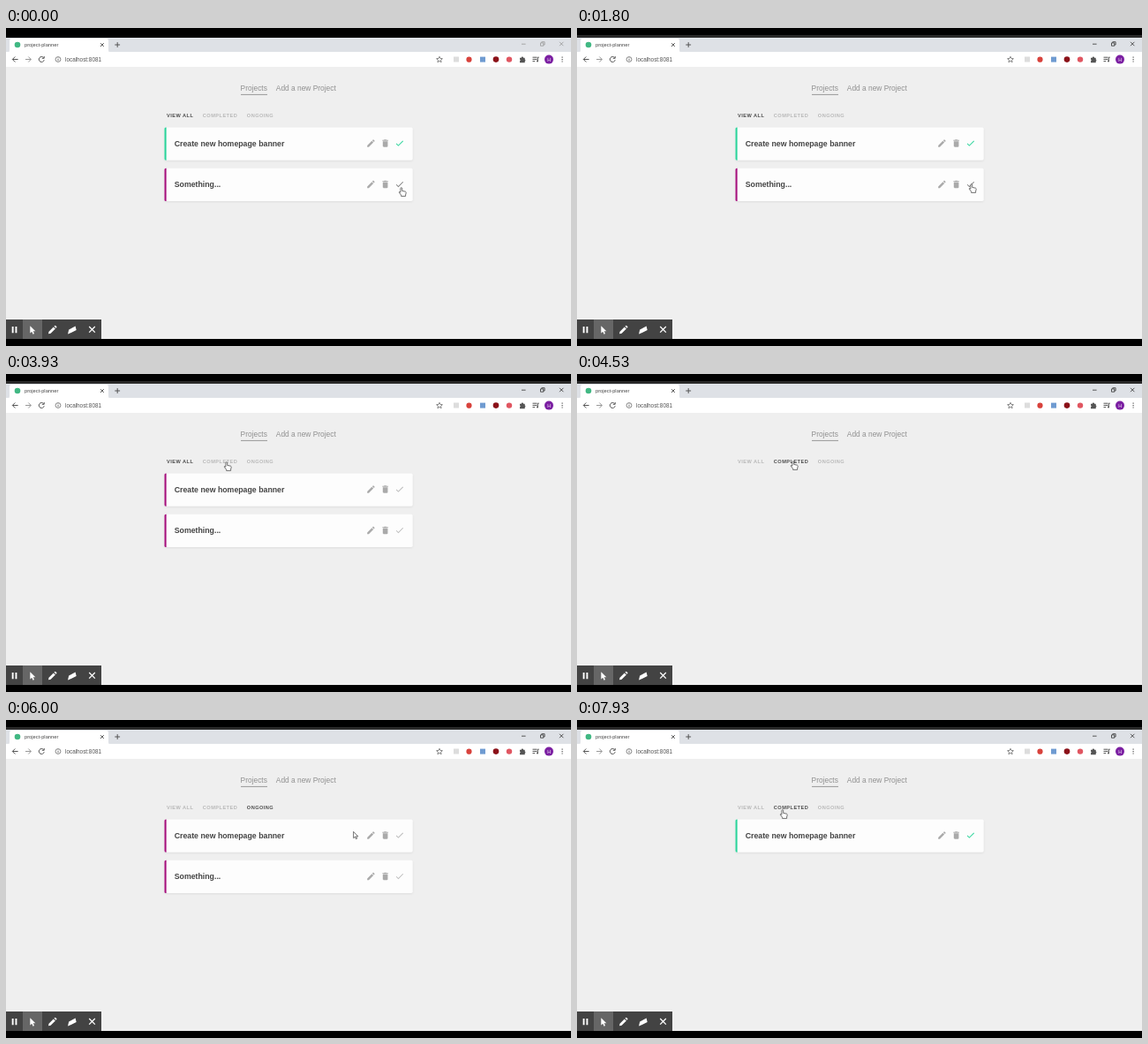
An HTML page for the animation above (8 s loop, 640x360 px).

```html
<!DOCTYPE html>
<html lang="en">
<head>
<meta charset="utf-8">
<title>Project planner</title>
<style>
  html, body { margin: 0; width: 100%; height: 100%; overflow: hidden; background: #000; }
  svg { display: block; width: 100vw; height: 100vh; }
  text { font-family: "Liberation Sans", Arial, sans-serif; }
  .nav { font-size: 8.4px; fill: #909090; }
  .filter { font-size: 5.62px; font-weight: bold; letter-spacing: .47px; fill: #b8b8b8; }
  .filter.on { fill: #4c4c4c; }
  .title { font-size: 8.77px; font-weight: bold; fill: #444; }
  .icon { fill: #aaa; }
  .line { fill: none; stroke: #555; stroke-width: 1; }
  .body { fill: #fdfdfd; filter: drop-shadow(.5px 1px .8px rgba(0,0,0,.07)); }
</style>
</head>
<body>
<svg viewBox="0 0 640 360">
  <rect width="640" height="360"/>
  <rect id="strip" y="8" width="640" height="3"/>

  <!-- tab strip -->
  <rect y="11" width="640" height="17" fill="#dee1e6"/>
  <path d="M1 28Q4 28 4 25V14Q4 12 6 12H114Q116 12 116 14V25Q116 28 119 28Z" fill="#fff"/>
  <circle cx="13" cy="19" r="3.3" fill="#41b883"/>
  <text x="21" y="21.2" font-size="5.75" fill="#444">project-planner</text>
  <path class="line" stroke-width=".8" d="M107 17.2l3.8 3.8m0-3.8l-3.8 3.8M123.3 19h5.8M126.2 16.1v5.8"/>
  <path id="controls" fill="none" stroke-width=".8" d="M584 18.2h4.6M605.5 16.9h3.3v3.3h-3.3zM606.8 16.9v-1.2h3.3v3.3h-1.3M627 15.8l4.4 4.4m0-4.4l-4.4 4.4"/>

  <!-- address row -->
  <rect y="27" width="640" height="17" fill="#fff"/>
  <path class="line" d="M13.6 35.5H7.4M10.3 32.5l-3 3 3 3"/>
  <path class="line" style="stroke:#999" d="M22 35.5h6.2M25.3 32.5l3 3-3 3"/>
  <path class="line" d="M42.6 33.6a3 3 0 1 0 .6 2.6M43.2 32v2.3h-2.4"/>
  <circle class="line" style="stroke-width:.7" cx="59" cy="35.5" r="2.9"/>
  <path class="line" style="stroke-width:.8" d="M59 35v2.1M59 33.6v.8"/>
  <text x="67" y="37.8" font-size="6.36" fill="#555">localhost:8081</text>
  <path class="line" style="stroke-width:.7" d="M491 32.3l1 2.2 2.4.2-1.8 1.6.5 2.4-2.1-1.3-2.1 1.3.5-2.4-1.8-1.6 2.4-.2z"/>
  <rect x="507" y="32.5" width="6" height="6" fill="#ddd"/>
  <circle cx="524.5" cy="35.7" r="3.1" fill="#d8423c"/>
  <rect x="537" y="32.6" width="6" height="6" fill="#6f9bd1"/>
  <circle cx="555" cy="35.6" r="3.3" fill="#8b1018"/>
  <circle cx="570" cy="35.6" r="3.2" fill="#e05661"/>
  <path fill="#555" d="M582 33.7h1.7a1.2 1.2 0 0 1 2.4 0h1.6v1.8a1.2 1.2 0 0 1 0 2.2v1.5H582v-1.7a1.1 1.1 0 0 0 0-2z"/>
  <path class="line" d="M596.5 33.2h5M596.5 35.4h5M596.5 37.6h2.7M602.3 37.5v-4.3h1.5"/>
  <circle cx="602" cy="37.6" r="1" fill="#555"/>
  <circle cx="615" cy="35.6" r="5" fill="#7b1fa2"/>
  <text x="615" y="37.5" font-size="5.2" fill="#fff" text-anchor="middle">H</text>
  <path d="M629.5 32.6h1.2v1.2h-1.2zM629.5 35h1.2v1.2h-1.2zM629.5 37.4h1.2v1.2h-1.2z" fill="#555"/>

  <!-- page -->
  <rect y="44" width="640" height="308" fill="#efefef"/>
  <text class="nav" x="265.6" y="71">Projects</text>
  <path d="M266 75.4h30" stroke="#999" stroke-width="1"/>
  <text class="nav" x="305.8" y="71">Add a new Project</text>
  <g id="filters"></g>
  <g id="cards"></g>

  <!-- recorder bar -->
  <rect y="330" width="108" height="22" fill="#434343"/>
  <rect x="19" y="330" width="22" height="22" fill="#666"/>
  <g fill="#fff">
    <path d="M6.7 338h1.9v7.2H6.7zM10.5 338h1.9v7.2h-1.9z"/>
    <path d="M27.3 337.2v8.3l2-1.7 1.3 2.9 1.4-.6-1.3-2.8h2.6z"/>
    <path d="M48 346.3l.5-2.6 5.3-5.3 2.1 2.1-5.3 5.3zM54.5 337.7l.8-.7q.5-.3.9 0l1.1 1.1q.3.5 0 .9l-.7.8z"/>
    <path d="M70 346.6l1.2-5.1 7.4-4 1.1 4.4-6 3.1z"/>
  </g>
  <path d="M94.2 338l6.6 6.6m0-6.6l-6.6 6.6" stroke="#fff" stroke-width="1.3"/>

  <circle id="ring" fill="none" stroke="#db6070" stroke-width="2.2"/>
  <path id="cursor" stroke="#444" stroke-width=".75" fill="#fff" stroke-linejoin="round"/>
</svg>
<script>
const LOOP = 8000;
const GREEN = '#2bd49a', PURPLE = '#a5107c';
const SLOT_TOP = 112.4, SLOT_STEP = 46.4;

const ICONS = {
  edit: 'M3 17.25V21h3.75L17.81 9.94l-3.75-3.75L3 17.25zM20.71 7.04c.39-.39.39-1.02 0-1.41l-2.34-2.34c-.39-.39-1.02-.39-1.41 0l-1.83 1.83 3.75 3.75 1.83-1.83z',
  bin: 'M6 19c0 1.1.9 2 2 2h8c1.1 0 2-.9 2-2V7H6v12zM19 4h-3.5l-1-1h-5l-1 1H5v2h14V4z',
  done: 'M9 16.2L4.8 12l-1.4 1.4L9 19 21 7l-1.4-1.4L9 16.2z'
};
const HAND = 'M-1.1 .7Q-1.1-.3-.2-.3T.7 .7V3.4L4.5 4.2Q5.3 4.5 5.2 5.6L4.6 8V9.4H-.4V8.2L-2.6 5.4Q-2.9 4.3-2 4.5L-1.1 5.2Z';
const ARROW = 'M0 0V7.3L1.7 5.8 2.8 8.3 4 7.8 2.9 5.4H5.2Z';

// Cursor hotspot: time, x, y
const PATH = [
  [0, 448, 181], [500, 447, 179], [1800, 447, 177], [2000, 447, 174],
  [2350, 446, 135], [2860, 446, 132], [3130, 428, 134], [3330, 428, 134],
  [3930, 250, 100], [4130, 245, 99], [4600, 245, 99], [5100, 282.5, 98],
  [5400, 282.5, 98], [6100, 400, 128], [6800, 428.5, 135], [6860, 446, 131],
  [7000, 446, 131], [7500, 235, 101], [7930, 233, 102]
];
const HOLDS = [[1860, 2000], [3130, 3330], [6860, 7000]];
const CLICKS = [600, 1300, 2700, 4090, 5260, 7560];
const VIEWS = [[0, 'all'], [4090, 'completed'], [5260, 'ongoing'], [7560, 'completed']];
const FILTERS = [['all', 'VIEW ALL', 182], ['completed', 'COMPLETED', 222.8], ['ongoing', 'ONGOING', 272.8]];

const $ = id => document.getElementById(id);

function add(parent, tag, attrs, text) {
  const el = document.createElementNS('http://www.w3.org/2000/svg', tag);
  for (const key in attrs) el.setAttribute(key, attrs[key]);
  if (text) el.textContent = text;
  return parent.appendChild(el);
}

const filters = FILTERS.map(([view, label, x]) =>
  ({ view, el: add($('filters'), 'text', { class: 'filter', x, y: 101.2 }, label) }));

function makeCard(title, isDone) {
  const group = add($('cards'), 'g', {});
  const icon = (name, x) => add(group, 'path',
    { class: 'icon', d: ICONS[name], transform: `translate(${x} 12.5) scale(.4685)` });
  add(group, 'rect', { class: 'body', x: 179.5, width: 281.2, height: 37.3, rx: 1.8 });
  const edge = add(group, 'path', { d: 'M181.6 0V37.3H181Q179.5 37.3 179.5 35.6V1.7Q179.5 0 181 0Z' });
  add(group, 'text', { class: 'title', x: 190.7, y: 21.7 }, title);
  icon('edit', 407.8);
  icon('bin', 424);
  return { group, edge, check: icon('done', 440.2), isDone };
}

const cards = [
  makeCard('Create new homepage banner', t => t < 2700 || t >= 6860),
  makeCard('Something...', t => t >= 600 && t < 1300)
];

function cursorAt(t) {
  const i = PATH.findIndex(p => p[0] > t);
  if (i < 0) return PATH[PATH.length - 1].slice(1);
  const [t0, x0, y0] = PATH[Math.max(i - 1, 0)], [t1, x1, y1] = PATH[i];
  const u = Math.max(0, (t - t0) / (t1 - t0)), ease = u * u * (3 - 2 * u);
  return [x0 + (x1 - x0) * ease, y0 + (y1 - y0) * ease];
}

const overCheck = ([x, y], top) => x > 440 && x < 452 && y > top + 12 && y < top + 24;
const overFilter = ([x, y]) => y > 94 && y < 105 &&
  (x > 182 && x < 212 || x > 222 && x < 263 || x > 272 && x < 303);

function drawCards(t, view, pointer) {
  const trailing = cursorAt(t - 200);
  let slot = 0, hand = false;
  for (const { group, edge, check, isDone } of cards) {
    const done = isDone(t);
    const shown = view === 'all' || done === (view === 'completed');
    group.style.display = shown ? '' : 'none';
    if (!shown) continue;
    const top = SLOT_TOP + SLOT_STEP * slot++;
    group.setAttribute('transform', `translate(0 ${top})`);
    edge.style.fill = done ? GREEN : PURPLE;
    check.style.fill = done ? GREEN : overCheck(trailing, top) ? '#777' : '#b8b8b8';
    hand = hand || overCheck(pointer, top);
  }
  return hand;
}

function drawRing(t, [x, y]) {
  const click = CLICKS.find(c => t >= c - 130 && t < c + 80);
  const ring = $('ring');
  ring.style.display = click ? '' : 'none';
  if (!click) return;
  const u = (t - click + 130) / 210;
  ring.setAttribute('cx', x + .5);
  ring.setAttribute('cy', y);
  ring.setAttribute('r', 15 * Math.min(1, .5 + 1.6 * u));
  ring.style.opacity = Math.min(1, (1 - u) * 2.5);
}

function draw(time) {
  let t = time % LOOP;
  const hold = HOLDS.find(([from, to]) => t >= from && t < to);
  if (hold) t = hold[0];

  const active = t >= 60;
  $('strip').style.fill = active ? '#292929' : '#000';
  $('controls').style.stroke = active ? '#333' : '#999';

  const view = VIEWS.filter(v => v[0] <= t).pop()[1];
  for (const f of filters) f.el.classList.toggle('on', f.view === view);

  const pointer = cursorAt(t);
  const hand = drawCards(t, view, pointer) || overFilter(pointer);
  drawRing(t, pointer);
  $('cursor').setAttribute('d', hand ? HAND : ARROW);
  $('cursor').setAttribute('transform', `translate(${pointer})`);
}

const start = performance.now();
function tick() {
  draw(performance.now() - start);
  requestAnimationFrame(tick);
}
tick();
</script>
</body>
</html>
```
